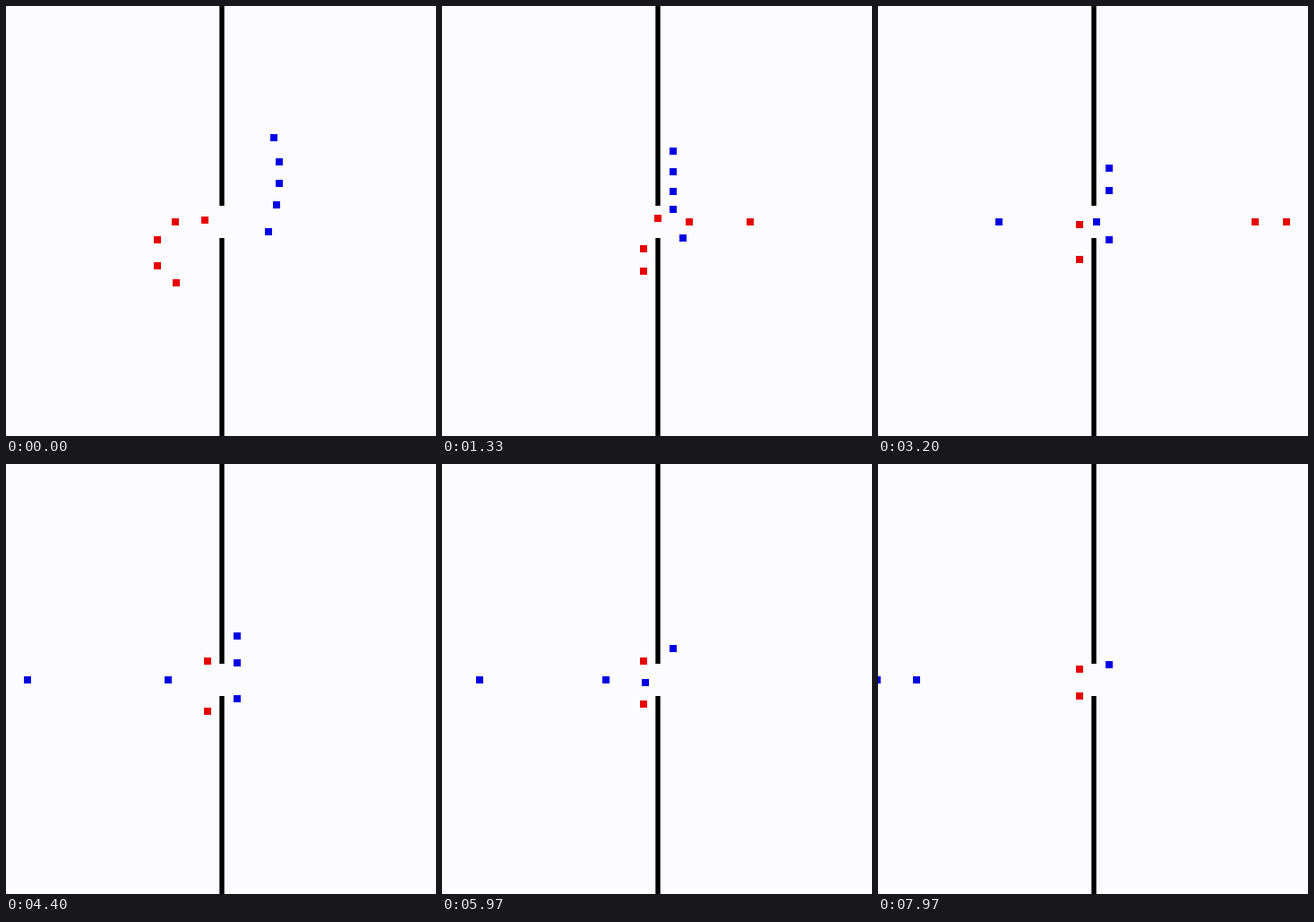
These frames come from a looping animation (480 by 480 pixels, 8 s). A matplotlib script:

```python
import numpy as np
import matplotlib.pyplot as plt
from matplotlib.animation import FuncAnimation
from matplotlib.patches import Rectangle

SIZE = 480
LOOP_MS = 8000
FRAMES = 240
STEP_MS = LOOP_MS / FRAMES
SIDE = 8
RED, BLUE = "#e60000", "#0000e2"
QUEUE_X = {RED: 225, BLUE: 258}     # where each crowd stands beside the wall
VELOCITY = {RED: 95, BLUE: -92}     # px per second once through the gap
GAP_TOP, GAP_END, GAP_MID = 223, 259, 241

# each frame shows the pose at the middle of its interval
T = (np.arange(FRAMES) + 0.5) * STEP_MS / 1000


def ease(u):
    u = np.clip(u, 0, 1)
    return u * u * (3 - 2 * u)


def distance(t, ramp):
    """Seconds of full-speed walking after speeding up evenly over ramp."""
    t = np.maximum(t, 0)
    return np.where(t < ramp, t * t / (2 * ramp), t - ramp / 2)


fig = plt.figure(figsize=(SIZE / 100, SIZE / 100), dpi=100, facecolor="#fcfcfe")
ax = fig.add_axes([0, 0, 1, 1])
ax.set_xlim(0, SIZE)
ax.set_ylim(SIZE, 0)
ax.axis("off")


def box(x, y, w, h, color, smooth=False):
    return ax.add_patch(Rectangle((x, y), w, h, fc=color, lw=0,
                                  antialiased=smooth, snap=not smooth))


for top, end in ((0, GAP_TOP), (GAP_END, SIZE)):
    box(238.3, top, 5.4, end - top, "black", smooth=True)

walkers = []


def walker(color, x, y, wait_y, leave, ramp=1, bend=1, settle=0.6,
           lane=GAP_MID, turn=1, moving=True):
    """Step up to the wall, creep to wait_y until leave, then take the lane."""
    gap = np.clip(1 - T / settle, 0, 1) ** 1.5
    px = QUEUE_X[color] + (x - QUEUE_X[color]) * gap
    if moving:
        px = px + VELOCITY[color] * distance(T - leave, ramp)
    py = y + (wait_y - y) * np.minimum(T / leave, 1) ** bend
    py = py + (lane - wait_y) * ease((T - leave) / turn)
    corner = np.round(np.column_stack([px, py])) - SIDE / 2
    walkers.append((box(*corner[0], SIDE, SIDE, color), corner))


walker(RED, 222, 239, wait_y=239, leave=0.01, ramp=0.1)
walker(RED, 187, 241, wait_y=236, leave=0.35, ramp=0.86)
walker(RED, 167, 262, wait_y=234, leave=0.9, ramp=0.5)
# pushed past the gap by a blue walker, then slides back towards it
walker(RED, 167, 291, wait_y=261, leave=2.55, bend=0.6, turn=1.5,
       lane=219.5 + 10 * ease((T - 6) / 2), moving=False)
walker(RED, 189, 310, wait_y=259, leave=8, bend=0.7)

walker(BLUE, 293, 245, wait_y=262, leave=5.2, ramp=0.9, bend=0.15, settle=2.4)
walker(BLUE, 304, 222, wait_y=228, leave=1.45, ramp=0.85, bend=1.3)
walker(BLUE, 307, 198, wait_y=220, leave=2.3, ramp=2.68, bend=1.7)
walker(BLUE, 307, 174, wait_y=227, leave=4.8, ramp=0.73, bend=1.25)
walker(BLUE, 301, 147, wait_y=224, leave=8, bend=0.9)


def draw(i):
    for square, corner in walkers:
        square.set_xy(corner[i])
    return [square for square, _ in walkers]


anim = FuncAnimation(fig, draw, frames=FRAMES, interval=STEP_MS,
                     repeat=True, repeat_delay=0, blit=False)
plt.show()
```
